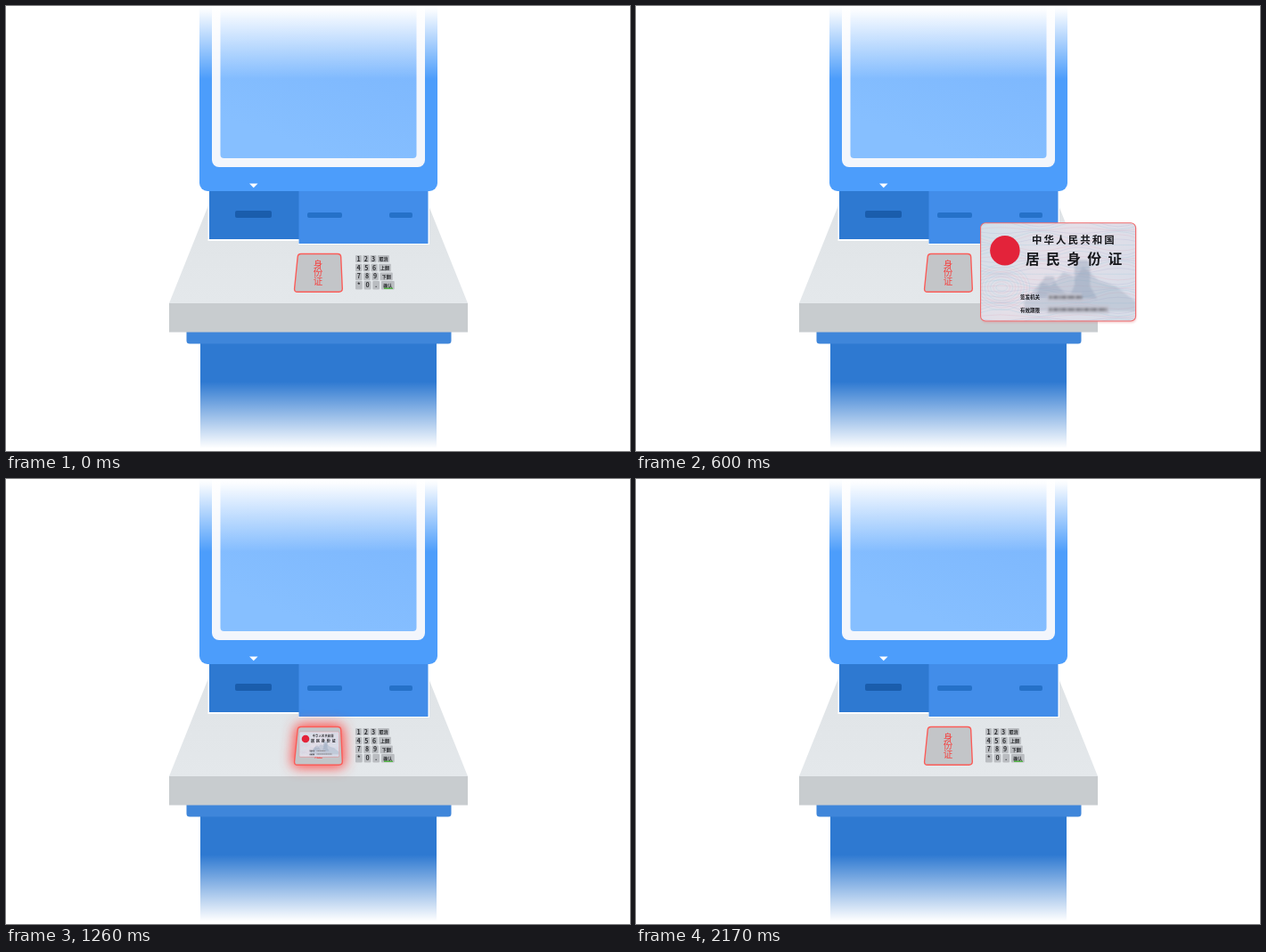
Recreate the animation shown at these times as an HTML page. Size 700 px wide and 500 px high, loop 2840 ms.

```html
<!DOCTYPE html>
<html lang="zh-CN">
<head>
<meta charset="utf-8">
<title>Card on reader</title>
<style>
  html, body { margin: 0; width: 100%; height: 100%; overflow: hidden; background: #fff; }
  svg { display: block; width: 700px; height: 500px; }
  text { font-family: "Noto Sans CJK SC", "Noto Sans CJK", sans-serif; }

  #card { animation: fade 2840ms infinite, move 2840ms infinite; }
  #glow { animation: glow 2840ms infinite; }

  @keyframes fade {
    0% { opacity: 0; animation-timing-function: steps(8); }
    8.4507% { opacity: 1; }
    65.8451% { opacity: 1; animation-timing-function: steps(10); }
    76.4085%, 100% { opacity: 0; }
  }
  @keyframes move {
    0% { transform: translate(407.5px, 229.2px) scale(1); }
    16.9014% { transform: translate(407.5px, 229.2px) scale(1); animation-timing-function: steps(15); }
    32.7465%, 100% { transform: translate(329px, 284px) scale(.2025); }
  }
  @keyframes glow {
    0% { opacity: 0; }
    35.9155% { opacity: 0; animation-timing-function: steps(8); }
    44.3662% { opacity: 1; animation-timing-function: steps(8); }
    52.8169%, 100% { opacity: 0; }
  }
</style>
</head>
<body>
<svg viewBox="0 0 700 500">
  <defs>
    <linearGradient id="topFade" x2="0" y2="1">
      <stop offset="0" stop-color="#fff"/>
      <stop offset=".07" stop-color="#fff" stop-opacity=".96"/>
      <stop offset="1" stop-color="#fff" stop-opacity="0"/>
    </linearGradient>
    <linearGradient id="footFade" x2="0" y2="1">
      <stop offset="0" stop-color="#fff" stop-opacity="0"/>
      <stop offset=".96" stop-color="#fff"/>
    </linearGradient>
    <linearGradient id="screen" x1="1" x2=".6" y2="1">
      <stop offset=".2" stop-color="#7ab5fd"/>
      <stop offset="1" stop-color="#86bfff"/>
    </linearGradient>
    <linearGradient id="tray" x2="0" y2="1">
      <stop offset="0" stop-color="#dfe3e6"/>
      <stop offset="1" stop-color="#e4e8eb"/>
    </linearGradient>
    <linearGradient id="paper" x2="1" y2=".5">
      <stop offset="0" stop-color="#d3e0e9"/>
      <stop offset=".5" stop-color="#e4dfe8"/>
      <stop offset="1" stop-color="#d9dde8"/>
    </linearGradient>
    <filter id="soft" x="-80%" y="-80%" width="260%" height="260%"><feGaussianBlur stdDeviation="7"/></filter>
    <filter id="haze" x="-20%" y="-20%" width="140%" height="140%"><feGaussianBlur stdDeviation="1.3"/></filter>
    <clipPath id="cardClip"><rect width="221" height="140" rx="7"/></clipPath>
    <path id="pad" d="M331 278.5H372Q375.5 278.5 375.7 282L377.3 317.5Q377.4 321.3 373.5 321.3H327Q323.3 321.3 323.6 317.5L327.2 282Q327.5 278.5 331 278.5Z"/>
  </defs>

  <!-- pillar -->
  <path fill="#2e79d1" d="M218 379H483V500H218Z"/>
  <path fill="url(#footFade)" d="M217 422H484V500H217Z"/>
  <path fill="#3f86da" d="M202.500 366H499.500V376Q499.500 379.500 496 379.500H206Q202.500 379.500 202.500 376Z"/>

  <!-- tray -->
  <path fill="url(#tray)" d="M231 214H470L518 334H183Z"/>
  <path fill="#c8cccf" d="M183 334H518V366.500H183Z"/>

  <!-- slot blocks -->
  <path fill="#fff" d="M226.500 208H475V268H328V264H226.500Z"/>
  <path fill="#2e79d1" d="M228 206H329V262H228Z"/>
  <path fill="#428de9" d="M328.500 206H473.500V267H328.500Z"/>
  <rect x="257" y="230" width="41" height="8" rx="2" fill="#1a5dac"/>
  <g fill="#2571c8">
    <rect x="338" y="232" width="39" height="6" rx="2"/>
    <rect x="430" y="232" width="26" height="6" rx="2"/>
  </g>

  <!-- monitor -->
  <rect x="217" y="-20" width="267" height="228" rx="9" fill="#4c9dfb"/>
  <rect x="231" y="-20" width="239" height="201" rx="8" fill="#f3f6fc"/>
  <rect x="240.500" y="-20" width="220" height="191" rx="4" fill="url(#screen)"/>
  <path fill="#fff" d="M273 199.500H282.500L277.750 204.300Z"/>
  <path fill="url(#topFade)" d="M216 0H485V82H216Z"/>

  <!-- reader -->
  <use id="glow" href="#pad" fill="#ff4d48" stroke="#ff4d48" stroke-width="6" filter="url(#soft)"/>
  <use href="#pad" fill="#c3c5c8" stroke="#fb5c58" stroke-width="1.400"/>
  <g fill="#f5413f" font-size="10.500" text-anchor="middle">
    <text x="350" y="293.500">身</text>
    <text x="350" y="303">份</text>
    <text x="350" y="312.800">证</text>
  </g>
  <g id="keys" text-anchor="middle" fill="#2b2d30" font-weight="700"></g>

  <g id="card">
    <rect x="1" y="1.500" width="221" height="141" rx="7" fill="#e58f92" opacity=".4" filter="url(#haze)"/>
    <rect width="221" height="140" rx="7" fill="url(#paper)"/>
    <g clip-path="url(#cardClip)">
      <g id="waves" fill="none" stroke-width=".7"></g>
      <g fill="#8d9fb6" filter="url(#haze)">
        <path opacity=".3" d="M62 112L86 84 100 90 118 70 136 78 146 62 168 82 192 90 221 112V126H62Z"/>
        <path opacity=".4" d="M134 60L139 53H152L156 60V90L166 108H126L134 88Z"/>
        <path opacity=".35" d="M86 86L92 76H104L108 88 126 106H78Z"/>
      </g>
    </g>
    <rect width="221" height="140" rx="7" fill="none" stroke="#ef6a6c" stroke-width="1.400"/>
    <circle cx="34.700" cy="39.300" r="21.300" fill="#e3233a"/>
    <g fill="#17181c">
      <text x="73" y="29.500" font-size="14.500" font-weight="600" letter-spacing="2.700">中华人民共和国</text>
      <text x="64" y="58.500" font-size="20" font-weight="700" letter-spacing="9.400">居民身份证</text>
      <g font-size="7" font-weight="600">
        <text x="56.500" y="108.700">签发机关</text>
        <text x="56.500" y="126.700">有效期限</text>
      </g>
    </g>
    <g id="masked" filter="url(#haze)"></g>
  </g>
</svg>
<script>
  const NS = "http://www.w3.org/2000/svg";
  const byId = id => document.getElementById(id);

  function add(parent, tag, attrs, content = "") {
    const node = document.createElementNS(NS, tag);
    for (const name in attrs) node.setAttribute(name, attrs[name]);
    node.textContent = content;
    parent.append(node);
  }

  // Keypad: rows widen towards the viewer.
  const rows = [["1", "2", "3", "取消"], ["4", "5", "6", "上翻"], ["7", "8", "9", "下翻"], ["*", "0", ".", "确认"]];
  rows.forEach((row, r) => {
    const y = 280 + r * 9.7, height = 8 + r * 0.45;
    row.forEach((label, c) => {
      const wide = c === 3;
      const x = 392 + c * (8.3 + r * 0.45);
      const width = wide ? 13 + r * 0.6 : 7 + r * 0.25;
      add(byId("keys"), "rect", { x, y, width, height, rx: 1, fill: "#b9bcc0" });
      add(byId("keys"), "text", {
        x: x + width / 2,
        y: y + height / 2 + (wide ? 1.9 : 2.6),
        "font-size": wide ? 5 : 7
      }, label);
    });
  });
  add(byId("keys"), "rect", { x: 424, y: 316.6, width: 10, height: 1.4, fill: "#55b848" });

  // Security print: interleaved tinted waves.
  const tints = ["#8fc3d8", "#d9a5b8", "#a9a6d0"];
  for (let i = 0; i < 36; i++) {
    const y = i * 4.6 - 10, bend = 12 * Math.sin(i * 0.7);
    add(byId("waves"), "path", {
      d: `M0 ${y}q28 ${-bend} 56 0t56 0 56 0 56 0`,
      stroke: tints[i % 3],
      opacity: 0.42
    });
  }
  for (let i = 0; i < 9; i++) {
    add(byId("waves"), "ellipse", {
      cx: 30, cy: 92, rx: 8 + i * 4, ry: 5 + i * 3.4, stroke: tints[i % 2], opacity: 0.35
    });
  }

  // Obscured values as soft blocks.
  function mask(x, y, width) {
    add(byId("masked"), "rect", { x, y, width, height: 12, fill: "#c3c5d0", opacity: 0.85 });
    for (let i = 0; i * 4 < width - 4; i++) {
      const shade = 125 + Math.round(25 * Math.sin(i * 2.3));
      add(byId("masked"), "rect", {
        x: x + 2 + i * 4, y: y + 3.5, width: 4, height: 5, fill: `rgb(${shade},${shade},${shade + 8})`, opacity: 0.75
      });
    }
  }
  mask(95, 100, 49);
  mask(95, 117.5, 88);
</script>
</body>
</html>
```
